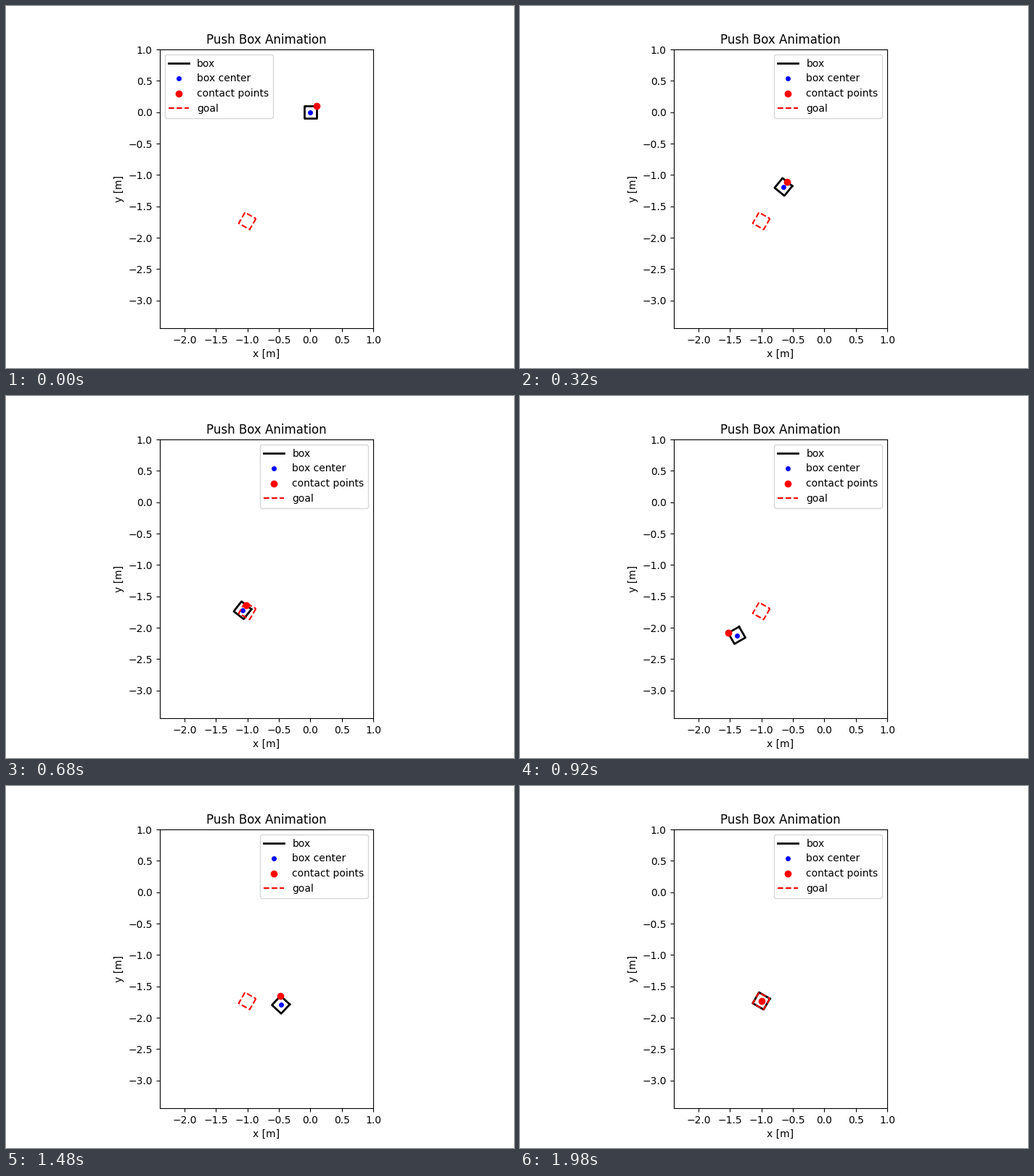
A matplotlib script that plays this animation: 700 px wide and 500 px high, repeating every 2 s.

```python
import numpy as np
import matplotlib.pyplot as plt
from matplotlib.animation import FuncAnimation

FRAMES = 100
HALF = 0.1
GOAL = (-1, -np.sqrt(3), 330)
CORNERS = HALF * np.array([(1, 1), (1, -1), (-1, -1), (-1, 1), (1, 1)])

# step, x, y, angle in degrees
WAYPOINTS = np.array([
    (0, 0, 0, 0),
    (16, -0.648, -1.19, -39),
    (34, -1.075, -1.721, -38),
    (46, -1.39, -2.12, 30),
    (54, -1.133, -2.4, 100),
    (57, -0.275, -1.952, 192),
    (66, -0.335, -1.727, 270),
    (74, -0.467, -1.792, 317),
    (84, -0.693, -1.813, 347),
    (99, *GOAL),
])


def monotone(t, k, v):
    """Cubic Hermite interpolation without overshoot."""
    h = np.diff(k)
    s = np.diff(v) / h
    m = np.concatenate([s[:1], np.zeros(len(k) - 2), s[-1:]])
    for i in range(1, len(k) - 1):
        a, b = s[i - 1], s[i]
        if a * b > 0:
            wa, wb = 2 * h[i] + h[i - 1], h[i] + 2 * h[i - 1]
            m[i] = (wa + wb) / (wa / a + wb / b)
    j = np.clip(np.searchsorted(k, t, side="right") - 1, 0, len(h) - 1)
    p = (t - k[j]) / h[j]
    return ((1 + 2 * p) * (1 - p) ** 2 * v[j] + p * (1 - p) ** 2 * h[j] * m[j]
            + p * p * (3 - 2 * p) * v[j + 1] + p * p * (p - 1) * h[j] * m[j + 1])


def place(points, x, y, deg):
    """Body coordinates to world coordinates."""
    c, s = np.cos(np.radians(deg)), np.sin(np.radians(deg))
    return np.asarray(points) @ np.array([(c, s), (-s, c)]) + (x, y)


def contact_point(i):
    """The pusher slides along the top face and lets go at the end."""
    if i == FRAMES - 1:
        return 0, 0
    u = np.interp(i, [0, 16, 34, 46, 74, 80], [1, 0, 0, -1, -1, 1])
    return u * HALF, HALF


steps = np.arange(FRAMES)
poses = np.column_stack([monotone(steps, WAYPOINTS[:, 0], col)
                         for col in WAYPOINTS[:, 1:].T])

fig, ax = plt.subplots(figsize=(7, 5), dpi=100)
ax.set_aspect("equal")
ax.set(xlim=(-2.395, 1), ylim=(-3.44, 1), xlabel="x [m]", ylabel="y [m]",
       title="Push Box Animation")

box, = ax.plot([], [], "k-", lw=2, label="box")
center, = ax.plot([], [], "bo", ms=4, label="box center")
contact, = ax.plot([], [], "ro", ms=6, zorder=3, label="contact points")
ax.plot(*place(CORNERS, *GOAL).T, "r--", label="goal")
ax.legend(loc="best")


def update(i):
    pose = poses[i]
    box.set_data(*place(CORNERS, *pose).T)
    center.set_data(pose[:1], pose[1:2])
    contact.set_data(*place([contact_point(i)], *pose).T)
    return box, center, contact


anim = FuncAnimation(fig, update, frames=FRAMES, interval=20, repeat=True,
                     repeat_delay=0)
plt.show()
```
